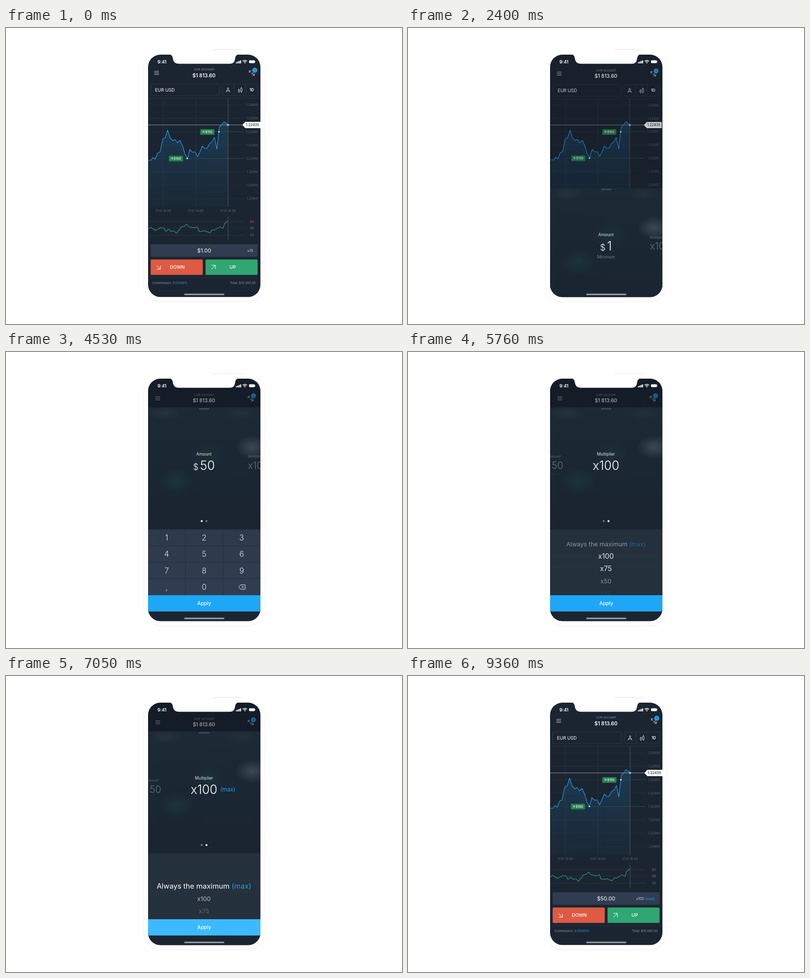
An HTML page for the animation above (9390 ms loop, 800 by 600 pixels).

```html
<!DOCTYPE html>
<html lang="en">
<head>
<meta charset="utf-8">
<style>
html, body { margin: 0; width: 100%; height: 100%; overflow: hidden; background: #fff; }
svg { display: block; width: 800px; height: 600px; font-family: Inter, "Liberation Sans", sans-serif; }
.body { filter: drop-shadow(0 1px 1.5px rgba(0, 0, 0, .07)); }
</style>
</head>
<body>
<svg id="stage" viewBox="0 0 800 600" fill="none"></svg>
<script>
const LOOP = 9390;
const WHITE = '#fff', BLUE = '#1ea1f2', GREY = '#5c6874';

// Text whose capitals are centred on y.
const text = (x, y, size, str, fill = WHITE, extra = '') =>
  `<text x="${x}" y="${(y + size * .364).toFixed(2)}" font-size="${size}" fill="${fill}" ${extra}>${str}</text>`;
const mid = (x, y, size, str, fill, extra = '') => text(x, y, size, str, fill, `text-anchor="middle" ${extra}`);
const end = (x, y, size, str, fill, extra = '') => text(x, y, size, str, fill, `text-anchor="end" ${extra}`);
const rect = (x, y, w, h, fill, extra = '') =>
  `<rect x="${x}" y="${y}" width="${w}" height="${h}" fill="${fill}" ${extra}/>`;
const path = (d, stroke, w = 1, extra = '') => `<path d="${d}" stroke="${stroke}" stroke-width="${w}" ${extra}/>`;
const dot = (x, y, r, fill, extra = '') => `<circle cx="${x}" cy="${y}" r="${r}" fill="${fill}" ${extra}/>`;
const bold = w => `font-weight="${w}"`;
const range = n => [...Array(n).keys()];

const price = [[287, 268], [293, 268], [297, 262.5], [301.5, 266], [306, 254], [311.5, 251], [316.5, 225], [321.5, 223],
  [326.5, 207], [331.5, 223], [337, 228.5], [341.5, 226], [346.5, 233], [351.5, 228], [357, 240], [361, 254],
  [366.5, 264.5], [371.5, 246.5], [377, 252], [382, 251], [387, 261], [391.5, 252], [396.5, 239.5], [401.5, 244],
  [406, 244], [411.5, 234], [416, 231.5], [421, 222], [426, 245.5], [431, 201], [436, 195.5], [440.5, 190], [444.5, 192.5], [448.5, 196.5]];
const wave = [407, 404, 407.5, 410, 407, 405, 405, 412, 408, 412, 411, 416, 410, 403, 402, 398, 403, 404, 405, 403,
  412, 412, 411, 413, 415, 409.5, 409, 406, 403, 406, 395, 391].map((y, i) => [287 + i * 5.2, y]);
const line = pts => 'M' + pts.map(p => p.join()).join('L');
const smooth = pts => pts.reduce((d, [x, y], i) => {
  if (!i) return `M${x},${y}`;
  const [a, b] = pts[i - 1], m = (a + x) / 2;
  return `${d}C${m},${b} ${m},${y} ${x},${y}`;
}, '');

const badge = (x, y, str) => rect(x, y - 5.7, 28.5, 11.4, '#25814f', 'rx="1"') +
  path(`M${x + 4} ${y + 2}l3.6-3.8m-3.4 0h3.4v3.6`, WHITE, .8) + text(x + 9.7, y, 6.4, str, WHITE, bold(500));

const header = () => path('M299.5 87.8H309M299.5 91H309M299.5 94.2H309', '#d5dade', .9) +
  mid(400, 84, 6.6, 'Live account', '#8b959f') + mid(400, 96, 10.1, '$1 813.60', WHITE, bold(600)) +
  path('M491.5 86.8l4 4m-4 0v-4h4M497 92l5 4m0-4v4h-4.4M495.5 94l5-4', '#dfe4e8', .9) +
  dot(502.5, 85.6, 5, BLUE) + mid(502.5, 85.6, 5.5, '1', '#123');

const toolbar = () => rect(292.5, 113.5, 138.7, 23.5, 'none', 'rx="1.5" stroke="#2b3643"') +
  rect(437, 113.5, 71, 23.5, 'none', 'rx="1.5" stroke="#2b3643"') + path('M460.5 113.5v23.5M484.5 113.5v23.5', '#2b3643') +
  text(301, 125.3, 9.1, 'EUR USD') + mid(496.5, 125.3, 8, '1D', WHITE, bold(600)) +
  path('M447.8 124.2L444.5 130.3M449.2 124.2l3.3 6.1M445 127.6h7', '#dfe4e8', .9) +
  dot(448.5, 122.6, 1.5, 'none', 'stroke="#dfe4e8" stroke-width=".9"') +
  path('M470.5 123.3v2m0 4v2M475.5 119.8v2m0 7.5v2', '#dfe4e8', .9) +
  rect(469.1, 125.3, 2.8, 4, 'none', 'rx=".8" stroke="#dfe4e8" stroke-width=".9"') +
  rect(474.1, 121.8, 2.8, 7.5, 'none', 'rx=".8" stroke="#dfe4e8" stroke-width=".9"');

const chart = () => path('M287 142.5H514', '#26313d') +
  path('M318 142V363M383.5 142V363', '#293541', .8) +
  range(8).map(i => {
    const y = 156 + i * 27.15;
    return path(`M287 ${y}H480`, '#26323e', .8) + end(508.3, y, 6.15, (1.226 - i * .001).toFixed(5), GREY);
  }).join('') +
  ['10', '14', '16'].map((h, i) => mid(317.7 + i * 65.5, 371, 6.3, `17.01 ${h}:00`, GREY)).join('') +
  `<path d="${line(price)}V363H287Z" fill="url(#area)"/>` +
  path('M357 264.5H480M421 210.5H480', '#22573f', .9) +
  path('M448.7 142V363M448.7 383V430', '#53606d', .9) + path('M287 196.5H480', '#a3acb4', .8) +
  path(line(price), BLUE, 1.15, 'stroke-linejoin="round"') +
  badge(329, 264.8, '$100') + badge(392.5, 210.8, '$150') +
  dot(366.3, 264.6, 1.4, WHITE) + dot(430.2, 210.5, 1.4, WHITE) +
  dot(448.7, 196.6, 1.6, BLUE, 'stroke="#fff" stroke-width=".8"') +
  '<path d="M477.5 196.6L483.5 190.2H514V203H483.5Z" fill="#fff"/>' + end(511.3, 196.7, 7.05, '1.22435', '#1b2531', bold(500)) +
  path('M287 392.5H480', '#3b2f38', .8) + path('M287 406H480', '#26323e', .8) + path('M287 420H480', '#22403c', .8) +
  path(smooth(wave), '#2fae74', 1.1) +
  mid(497, 392.7, 6.7, '80', '#c94d40') + mid(497, 406, 6.7, '50', '#7d8790') + mid(497, 419.8, 6.7, '20', '#4c8f76');

const order = () => rect(292.3, 438.3, 216, 25.5, '#303d51', 'rx="2"') +
  mid(400.3, 451.2, 11, '', WHITE, 'id="stake"') + end(499, 451.2, 7.3, '', '#c9cfd6', 'id="factor"') +
  rect(292.3, 469.3, 105.2, 31.3, '#de5a43', 'rx="2"') + rect(403.1, 469.3, 105.2, 31.3, '#30a673', 'rx="2"') +
  path('M304 481.5l8 7.5m0-7v7h-7.2', WHITE) + path('M415 489l8-8m-7.8 0h7.8v7.8', WHITE) +
  mid(346, 485, 9.3, 'DOWN', WHITE, bold(500)) + mid(458, 485, 9.4, 'UP', WHITE, bold(500)) +
  path('M287 506.5H514', '#27323e', .8) +
  text(296, 516.2, 6.35, `Commission: <tspan fill="${BLUE}">0.01300%</tspan>`, '#8a949e') +
  end(504.5, 516.2, 6.35, 'Total: $10 000.00', '#8a949e');

const key = (label, i) => {
  const x = 324.5 + i % 3 * 75.8, y = 376.5 + (i / 3 | 0) * 33.3;
  return label === '<'
    ? path(`M${x - 6} ${y}l4-4.6h9v9.2h-9zM${x} ${y - 2}l4 4m0-4l-4 4`, '#e4e8ec', 1, 'stroke-linejoin="round"')
    : mid(x, y, 15.6, label, '#e4e8ec', bold(300));
};
const keypad = () => rect(287, 359.3, 227, 134, 'url(#keys)') +
  path('M287 359.5H514M287 392.7H514M287 426H514M287 459.3H514M362.4 359V493M438.2 359V493', '#222d3b', .9) +
  [...'123456789,0<'].map(key).join('');

const max = `<tspan fill="${BLUE}">(max)</tspan>`;
const rows = ['Always the maximum ' + max, 'x100', 'x75', 'x50', 'x25', 'x10'];
const factors = ['x100', 'x100', 'x75', 'x50', 'x25', 'x10'];
const list = () => rect(287, 359.3, 227, 134, '#24303c') +
  path('M287 415H514M287 436.5H514', '#2b3743', .7) +
  rows.map((r, i) => `<g id="row${i}">${mid(0, 0, 14.7, r)}</g>`).join('');

const sheet = () => rect(287, 112.5, 227, 434, '#1b2733') +
  rect(287, 112.5, 227, 246, 'url(#shade)') +
  `<ellipse cx="497" cy="193" rx="34" ry="24" fill="url(#pale)"/><ellipse cx="344" cy="262" rx="36" ry="26" fill="url(#green)"/>
   <ellipse cx="410" cy="208" rx="36" ry="26" fill="url(#green)" opacity=".6"/><ellipse cx="322" cy="124" rx="34" ry="14" fill="url(#pale)" opacity=".3"/>
   <ellipse cx="476" cy="124" rx="34" ry="14" fill="url(#pale)" opacity=".2"/>` +
  rect(389.8, 113.7, 21.5, 3, '#3c4853', 'rx="1.5"') +
  `<g id="amount">${mid(0, -23, 8.4, 'Amount', '#dfe3e7')}${mid(0, 0, 25, '', WHITE, 'id="sum" font-weight="300"')}${mid(0, 22.3, 8.4, 'Minimum', '#71808b', 'id="minimum"')}</g>` +
  `<g id="multiplier">${mid(0, -23, 8.3, 'Multiplier', '#dfe3e7')}${mid(0, 0, 25, '', WHITE, 'id="times" font-weight="300"')}${text(33, .3, 11.2, '(max)', BLUE, 'id="tag"')}</g>` +
  dot(395.4, 342.8, 2, WHITE, 'id="dot0"') + dot(405, 342.8, 2, WHITE, 'id="dot1"') +
  `<g id="keypad">${keypad()}</g><g id="list">${list()}</g>` +
  rect(287, 493, 227, 33, '#1ea7f6') + rect(287, 493, 227, 33, '#3dbaff', 'id="press"') +
  mid(400.5, 509, 10, 'Apply', WHITE, bold(500)) + rect(287, 526, 227, 21, '#1b2531');

const status = () => text(306, 68.8, 9, '9:41', WHITE, bold(600)) +
  range(4).map(i => rect(464.5 + i * 2.8, 69.3 - i * 1.3, 2, 2.4 + i * 1.3, WHITE, 'rx=".5"')).join('') +
  path('M478 67.3q4.5-3.8 9 0M479.8 69q2.7-2.2 5.4 0', WHITE, 1.3) + dot(482.5, 70.8, 1, WHITE) +
  rect(491, 65.6, 11.8, 5.6, WHITE, 'rx="1.4"') + rect(503.4, 67.4, .9, 2, '#a9b0b7', 'rx=".4"');

const glow = (id, color, alpha) => `<radialGradient id="${id}"><stop stop-color="${color}" stop-opacity="${alpha}"/><stop offset="1" stop-color="${color}" stop-opacity="0"/></radialGradient>`;
const fade = (id, c0, a0, c1, a1) => `<linearGradient id="${id}" x2="0" y2="1"><stop stop-color="${c0}" stop-opacity="${a0}"/><stop offset="1" stop-color="${c1}" stop-opacity="${a1}"/></linearGradient>`;

document.getElementById('stage').innerHTML = `<defs>
  <clipPath id="screen"><rect x="287" y="54" width="227" height="491.3" rx="25"/></clipPath>
  ${fade('area', '#1e8fd0', .2, '#1e8fd0', .02)}${fade('keys', '#2e3a4a', 1, '#303d51', 1)}${fade('shade', '#1c2a36', 1, '#192430', 1)}
  ${glow('pale', '#56636e', .55)}${glow('green', '#1f4a41', .4)}</defs>
  ${path('M418 43.5H477', '#e4e4e4')}
  <rect class="body" x="279" y="46" width="243" height="508" rx="33" fill="#fff"/>
  <g clip-path="url(#screen)">${rect(287, 54, 227, 492, '#1b2531')}
    <g id="back">${header()}${toolbar()}${chart()}${order()}</g>
    ${rect(287, 54, 227, 492, '#0b1018', 'id="dim"')}
    <g id="sheet">${sheet()}</g></g>
  <path d="M329 53C335 54 336 57 337 61C338 69 342 72.5 349 72.5H452C459 72.5 462 69 463 61C464 57 465 54 471 53Z" fill="#fff"/>
  ${status()}${rect(360, 538.4, 81, 3, '#9a9fa5', 'rx="1.5"')}`;

const $ = id => document.getElementById(id);
const set = (id, name, value) => $(id).setAttribute(name, value);
const put = (id, html) => { if ($(id).dataset.v !== html) $(id).innerHTML = $(id).dataset.v = html; };
const clamp = v => Math.max(0, Math.min(1, v));
const part = (t, from, to) => clamp((t - from) / (to - from));
const ease = v => (1 - Math.cos(Math.PI * v)) / 2;
const easeOut = v => 1 - (1 - v) ** 3;

// A carousel page: full size in the centre, small and faint at the sides.
const page = (id, side) => {
  const d = Math.abs(side);
  set(id, 'transform', `translate(${400 + side * 103.5} 230) scale(${1 - .22 * d})`);
  set(id, 'opacity', 1 - .67 * d);
};

function draw(t) {
  const open = easeOut(part(t, 2280, 2850)) * (1 - ease(part(t, 7110, 7650)));
  const swipe = ease(part(t, 4650, 5100));
  const pos = 5 * (1 - ease(part(t, 5250, 6055)));
  const sum = t < 3510 ? '1' : t < 3930 ? '5' : '50';
  const done = t > 6900;

  const s = 1 - .025 * open;
  set('back', 'transform', `translate(400 210) scale(${s}) translate(-400 -210)`);
  set('dim', 'opacity', .42 * open);
  set('sheet', 'transform', `translate(0 ${434 * (1 - open)})`);
  set('sheet', 'visibility', open > 0 ? 'visible' : 'hidden');
  put('stake', done ? '$50.00' : '$1.00');
  put('factor', done ? 'x100 ' + max : 'x10');

  page('amount', -swipe);
  page('multiplier', 1 - swipe);
  put('sum', `<tspan font-size="17.5">$</tspan><tspan dx="3">${sum}</tspan>`);
  set('minimum', 'opacity', sum === '1' ? 1 : .3 * swipe);
  put('times', factors[Math.round(pos)]);
  set('tag', 'opacity', pos < .5 ? 1 : 0);
  set('dot0', 'opacity', 1 - .62 * swipe);
  set('dot1', 'opacity', .38 + .62 * swipe);

  set('keypad', 'opacity', swipe < 1 ? 1 : 0);
  set('list', 'opacity', swipe);
  rows.forEach((_, i) => {
    const y = (i - pos) * 25, d = Math.abs(y);
    set('row' + i, 'transform', `translate(400 ${426 + y}) scale(${1 - .16 * clamp(d / 25) ** 2})`);
    set('row' + i, 'opacity', clamp(1.1 - .0165 * d));
  });
  set('press', 'opacity', part(t, 6930, 7020) * (1 - part(t, 7110, 7300)));
}

function tick() {
  draw(performance.now() % LOOP);
  requestAnimationFrame(tick);
}
tick();
</script>
</body>
</html>
```
